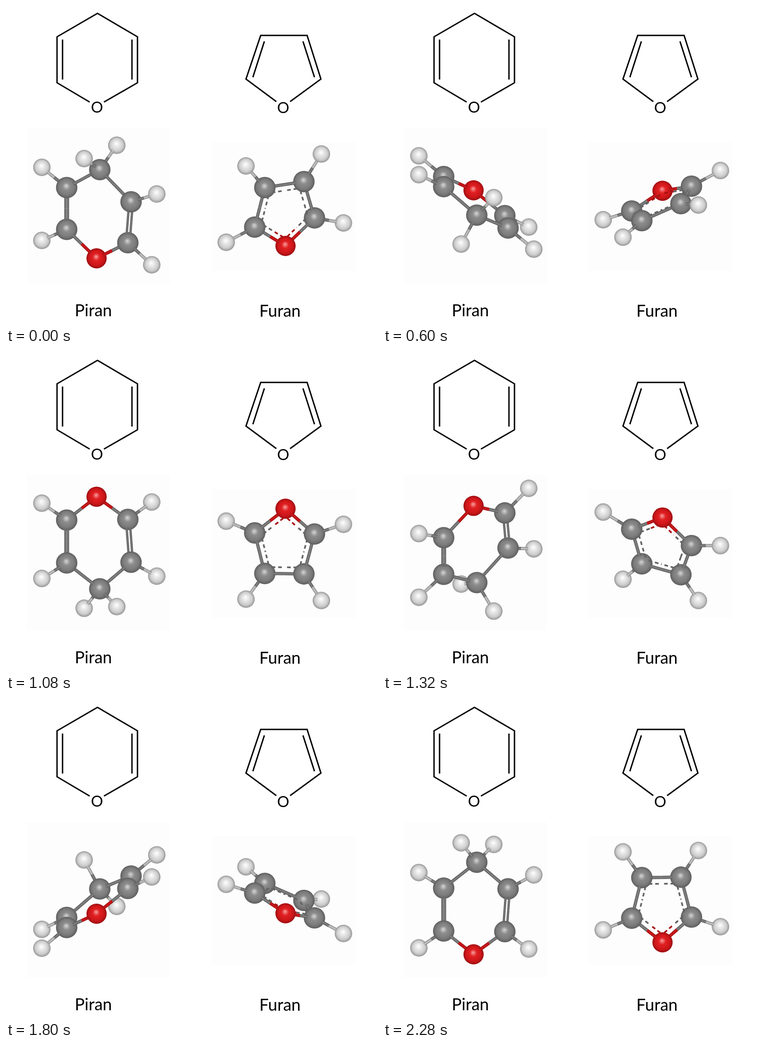
Recreate the animation shown at these times as an HTML page with a canvas. Size 807 px wide and 694 px high, loop 2400 ms.

```html
<!DOCTYPE html>
<html lang="es">
<head>
<meta charset="utf-8">
<title>Piran y furan</title>
<style>
  html, body { margin: 0; width: 100%; height: 100%; overflow: hidden; background: #fff; }
  canvas, svg { position: absolute; left: 0; top: 0; width: 807px; height: 694px; }
  path { fill: none; stroke: #000; stroke-width: 3; stroke-linejoin: miter; }
  text { font-family: Lato, "Open Sans", sans-serif; font-size: 36px; text-anchor: middle; }
  .atom { font-size: 33px; }
</style>
</head>
<body>
<canvas id="stage" width="807" height="694"></canvas>
<svg viewBox="0 0 807 694">
  <path d="M182 209L111 167V67L199 16L286 67V167L213 209M123 73V160M274 73V160"/>
  <path d="M588 208L522 159L554 64H655L685 159L618 208M562 77L537 155M646 77L671 155"/>
  <text class="atom" x="198" y="232">O</text>
  <text class="atom" x="603" y="233">O</text>
  <text x="190" y="675">Piran</text>
  <text x="596" y="676">Furan</text>
</svg>
<script>
const ctx = document.getElementById('stage').getContext('2d');
const STEPS = 20, STEP_MS = 120, AXIS_Y = 433;

// Sphere radius, shading from highlight to rim, bond rim and core colours
const ELEMENTS = {
  C: { r: 23.3, shade: ['#d6d6d6', '#8c8c8c', '#7c7c7c', '#5e5e5e'], rim: '#636363', core: '#7d7d7d' },
  H: { r: 19, shade: ['#ffffff', '#e6e6e6', '#cdcdcd', '#969696'], rim: '#959595', core: '#bdbdbd' },
  O: { r: 22, shade: ['#f7a0a0', '#e02022', '#cf1619', '#9c1013'], rim: '#a81013', core: '#c9181b' }
};

// Atoms: element, x, height and depth at angle zero.
// Bonds: atom, atom, half distance between the lines of a double bond.
const pyran = {
  atoms: [
    ['O', 197, 116, -32], ['C', 132, 53, -62], ['C', 132, -38, -40],
    ['C', 204, -77, 22], ['C', 272, -7, 50], ['C', 265, 82, 23],
    ['H', 78, 77, -107], ['H', 78, -82, -66], ['H', 170, -101, 85],
    ['H', 241, -130, -16], ['H', 328, -24, 96], ['H', 317, 130, 48]
  ],
  bonds: [[0, 1], [1, 2, 2.8], [2, 3], [3, 4], [4, 5, 4], [5, 0],
          [1, 6], [2, 7], [3, 8], [3, 9], [4, 10], [5, 11]]
};
const furan = {
  atoms: [
    ['O', 608, 89, -31], ['C', 541, 48, 13], ['C', 563, -38, 34],
    ['C', 648, -51, -3], ['C', 671, 28, -41],
    ['H', 479, 81, 32], ['H', 522, -85, 70], ['H', 686, -111, 0], ['H', 734, 39, -75]
  ],
  bonds: [[0, 1], [1, 2], [2, 3], [3, 4], [4, 0], [1, 5], [2, 6], [3, 7], [4, 8]],
  aromatic: 5
};

const mix = (p, q, t) => ({
  x: p.x + (q.x - p.x) * t, y: p.y + (q.y - p.y) * t, z: p.z + (q.z - p.z) * t
});
const gap = (p, q) => Math.hypot(q.x - p.x, q.y - p.y, q.z - p.z);

function turn([el, x, a, b], angle) {
  const c = Math.cos(angle), s = Math.sin(angle);
  return { el: ELEMENTS[el], x, y: AXIS_Y + a * c + b * s, z: b * c - a * s };
}

function drawAtom({ el, x, y }) {
  const g = ctx.createRadialGradient(x - 1, y - 4, 0, x, y, el.r);
  [0, 0.35, 0.72, 1].forEach((stop, i) => g.addColorStop(stop, el.shade[i]));
  ctx.fillStyle = g;
  ctx.beginPath();
  ctx.arc(x, y, el.r, 0, Math.PI * 2);
  ctx.fill();
}

function stroke(p, q, dx, width, color) {
  ctx.strokeStyle = color;
  ctx.lineWidth = width;
  ctx.beginPath();
  ctx.moveTo(p.x + dx, p.y);
  ctx.lineTo(q.x + dx, q.y);
  ctx.stroke();
}

function drawRod(p, q, el, half) {
  const offsets = half ? [-half, half] : [0];
  for (const dx of offsets) {
    stroke(p, q, dx, half ? 5 : 7, el.rim);
    stroke(p, q, dx, half ? 1.8 : 3.4, el.core);
  }
}

function drawDashes(p, q, el) {
  ctx.setLineDash([8, 6]);
  stroke(p, q, 0, 3.6, el.rim);
  ctx.setLineDash([]);
}

function drawMolecule({ atoms, bonds, aromatic = 0 }, angle) {
  const pts = atoms.map(a => turn(a, angle));
  const items = pts.map(p => ({ z: p.z, draw: () => drawAtom(p) }));

  // Each bond is two halves in the colours of its atoms
  const addHalf = (from, mid, el, paint) =>
    items.push({ z: (from.z + mid.z) / 2, draw: () => paint(from, mid, el) });

  for (const [i, j, half = 0] of bonds) {
    const p = pts[i], q = pts[j], d = gap(p, q), mid = mix(p, q, 0.5);
    const rod = (s, e, el) => drawRod(s, e, el, half);
    addHalf(mix(p, q, 0.85 * p.el.r / d), mid, p.el, rod);
    addHalf(mix(q, p, 0.85 * q.el.r / d), mid, q.el, rod);
  }

  if (aromatic) {
    const ring = pts.slice(0, aromatic);
    const mean = k => ring.reduce((sum, p) => sum + p[k], 0) / aromatic;
    const centre = { x: mean('x'), y: mean('y'), z: mean('z') };
    const inner = ring.map(p => mix(centre, p, 0.78));
    inner.forEach((p, i) => {
      const j = (i + 1) % aromatic, q = inner[j], trim = 6 / gap(p, q);
      const mid = mix(p, q, 0.5);
      addHalf(mix(p, q, trim), mid, ring[i].el, drawDashes);
      addHalf(mix(q, p, trim), mid, ring[j].el, drawDashes);
    });
  }

  items.sort((a, b) => a.z - b.z).forEach(item => item.draw());
}

function render(now) {
  const step = Math.floor(now / STEP_MS) % STEPS;
  const angle = step / STEPS * Math.PI * 2;
  ctx.fillStyle = '#fff';
  ctx.fillRect(0, 0, 807, 694);
  ctx.fillStyle = '#fdfdfd';
  ctx.fillRect(45, 265, 312, 339);
  ctx.fillRect(447, 296, 313, 280);
  drawMolecule(pyran, angle);
  drawMolecule(furan, angle);
}

function loop() {
  render(performance.now());
  requestAnimationFrame(loop);
}
render(0);
requestAnimationFrame(loop);
</script>
</body>
</html>
```
